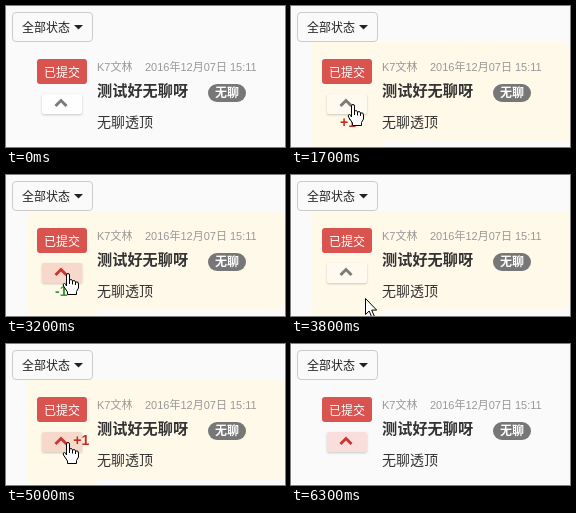
An HTML page for the animation above (7000 ms loop, 279 px wide and 141 px high).

```html
<!DOCTYPE html>
<html lang="zh-CN">
<head>
<meta charset="utf-8">
<style>
html, body { margin: 0; width: 100%; height: 100%; overflow: hidden; background: #fafafa; }
svg { display: block; width: 279px; height: 141px; font-family: "Liberation Sans", "Noto Sans CJK SC", "Noto Sans CJK", sans-serif; }
.bold { font-weight: bold; }
#button { filter: drop-shadow(0 1px 1px rgba(0, 0, 0, .2)); }
</style>
</head>
<body>
<svg viewBox="0 0 279 141">
  <g id="row">
    <rect x="21" y="36" width="258" height="105" fill="#fff9e9"/>
    <rect x="91" y="135" width="188" height="6" fill="#fafafa"/>
  </g>

  <rect x="6.5" y="6.5" width="80" height="29" rx="3.5" fill="#fafafa" stroke="#ccc"/>
  <text x="16" y="25.5" font-size="12" fill="#222">全部状态</text>
  <path d="M68 19h9l-4.500 4.500z" fill="#222"/>

  <rect x="31" y="53" width="50" height="25" rx="3" fill="#d9534f"/>
  <text x="38" y="70.5" font-size="12" fill="#fff">已提交</text>

  <rect id="button" x="36" y="88" width="40" height="20" rx="2"/>
  <path id="chevron" d="M49.500 100l5.500-5.500 5.500 5.500" fill="none" stroke-width="3"/>

  <text x="91" y="65" font-size="11" fill="#999">K7文林</text>
  <text x="139" y="65" font-size="11" fill="#999">2016年12月07日 15:11</text>
  <text id="vote" class="bold" font-size="14"></text>
  <text x="91" y="90" font-size="15.2" class="bold" fill="#333">测试好无聊呀</text>
  <rect x="202" y="78" width="38" height="18" rx="9" fill="#777"/>
  <text x="209" y="91" font-size="12" class="bold" fill="#fff">无聊</text>
  <text x="91" y="121" font-size="14" fill="#333">无聊透顶</text>

  <g id="cursor" fill="#fff" stroke="#000" stroke-linejoin="round">
    <path id="arrow" d="M.5.5v16l3.700-3.500 2.600 6.200 2.500-1-2.600-6.100h5z"/>
    <g id="hand">
      <path d="M-1.500 13V2Q-1.500.5 0 .5T1.500 2V7Q4 5.500 4.500 8 7 6.500 7.500 9 10.500 8 10.500 11V15L8.500 18.500V21.500H-.5V19L-4.500 13Q-5.500 10.500-3.500 10.500-2.500 10.500-1.500 13Z"/>
      <path d="M1.500 7v4M4.500 8v3.500M7.500 9v3" fill="none"/>
    </g>
  </g>
</svg>
<script>
const LOOP = 7000, STEP = 100;
const HOVER_START = 300, ENTER = 600, EXIT = 5400, HOVER_END = 6300;
const FIRST_CLICK = 1700, CLICK_GAP = 1500, CLICKS = 3;
const home = [62, 98], entry = [60, 140], aside = [74, 124];

const byId = id => document.getElementById(id);
const row = byId("row"), button = byId("button"), chevron = byId("chevron"), vote = byId("vote");
const cursor = byId("cursor"), arrow = byId("arrow"), hand = byId("hand");

const mix = (a, b, p) => a.map((v, i) => v + (b[i] - v) * p);
const ramp = (t, from, to) => Math.min(1, Math.max(0, (t - from) / (to - from)));
const ease = (t, from, to) => (1 - Math.cos(Math.PI * ramp(t, from, to))) / 2;
const rgb = c => `rgb(${c.map(Math.round).join()})`;
const show = (el, on) => el.style.display = on ? "" : "none";

function pointerAt(t, sinceClick, isLast) {
  if (t < FIRST_CLICK) return mix(entry, home, ease(t, ENTER, 1000));
  if (isLast) {
    const p = ramp(t, EXIT, HOVER_END);
    return [home[0] + 230 * p, home[1] + 26 * Math.sin(Math.PI * p)];
  }
  // Step aside after the click, then come back for the next one
  return mix(home, aside, ease(sinceClick, 200, 650) - ease(sinceClick, 800, 1200));
}

function draw(now) {
  const t = Math.floor(now % LOOP / STEP) * STEP;
  const click = Math.min(CLICKS - 1, Math.floor((t - FIRST_CLICK) / CLICK_GAP));
  const sinceClick = t - FIRST_CLICK - click * CLICK_GAP;
  const upvote = click % 2 === 0;
  const hovered = t >= HOVER_START && t < HOVER_END;
  show(row, hovered);

  const change = ramp(sinceClick, 0, 300);
  const voted = click < 0 ? 0 : upvote ? change : 1 - change;
  const plain = hovered ? [255, 250, 239] : [254, 254, 254];
  const pink = hovered ? [247, 217, 203] : [250, 222, 220];
  button.setAttribute("fill", rgb(mix(plain, pink, voted)));
  chevron.setAttribute("stroke", rgb(mix([125, 125, 120], [203, 55, 50], voted)));

  show(vote, click >= 0 && sinceClick < 600);
  const rise = ease(sinceClick, 0, 500);
  vote.textContent = upvote ? "+1" : "-1";
  vote.setAttribute("fill", upvote ? "#c12e20" : "#3c963c");
  vote.setAttribute("x", 49 + 28 * rise);
  vote.setAttribute("y", 121 - 30 * rise);

  const [x, y] = pointerAt(t, sinceClick, click === CLICKS - 1).map(Math.round);
  const overButton = x >= 36 && x < 76 && y >= 88 && y < 108;
  show(cursor, t >= ENTER && t < HOVER_END);
  show(hand, overButton);
  show(arrow, !overButton);
  cursor.setAttribute("transform", `translate(${x} ${y})`);
}

const start = performance.now();
function tick() {
  draw(performance.now() - start);
  requestAnimationFrame(tick);
}
tick();
</script>
</body>
</html>
```
